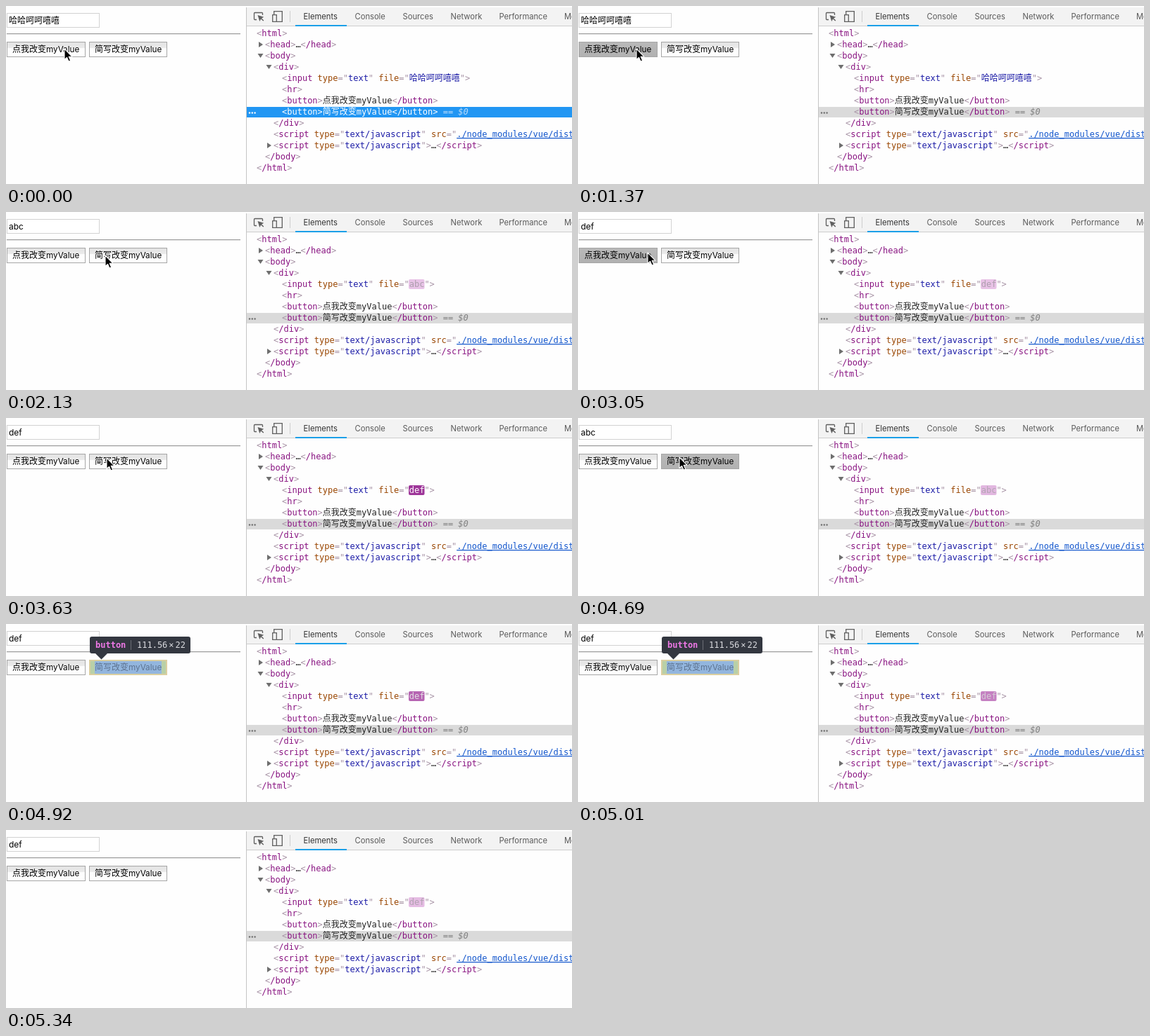
An HTML page for the animation above (5.71 s loop, 804 px wide and 254 px high).

```html
<!DOCTYPE html>
<html lang="zh-CN">
<head>
<meta charset="utf-8">
<title>myValue</title>
<style>
html, body { margin: 0; width: 100%; height: 100%; overflow: hidden; background: #fefefe; }
svg { display: block; width: 804px; height: 254px; }
text { white-space: pre; }
.ui { font: 12px Inter, "Noto Sans CJK SC", "Noto Sans CJK", sans-serif; fill: #000; }
.btn .latin { font-size: 11.7px; }
.tab { font: 11.2px Inter, sans-serif; fill: #5a5a5a; }
.tab.on { fill: #333; }
.code { font: 12px "DejaVu Sans Mono", "Noto Sans CJK SC", "Noto Sans CJK", monospace; fill: #222; }
.p { fill: #a894a6; }
.n { fill: #881280; }
.a { fill: #994500; }
.v { fill: #1a1aa6; }
.l { fill: #1155cc; text-decoration: underline; }
.eq { fill: #7f7f7f; }
.eq .zero { font-style: italic; }
.sel, .sel tspan { fill: #fff; }
.sel .eq, .sel .eq tspan { fill: #b9dcfb; }
</style>
</head>
<body>
<svg id="stage" viewBox="0 0 804 254" lang="zh-CN">
  <defs>
    <linearGradient id="idle" x2="0" y2="1">
      <stop offset="0" stop-color="#e3e3e3"/><stop offset=".4" stop-color="#ebebeb"/>
      <stop offset=".43" stop-color="#fdfdfd"/><stop offset="1" stop-color="#fefefe"/>
    </linearGradient>
    <linearGradient id="down" x2="0" y2="1">
      <stop offset="0" stop-color="#b9b9b9"/><stop offset="1" stop-color="#b1b1b1"/>
    </linearGradient>
  </defs>
  <rect width="804" height="254" fill="#fefefe"/>
  <g id="page"></g>
  <g id="tools"></g>
  <g id="inspect">
    <rect x="118" y="51" width="111" height="22" fill="#dbcfa0"/>
    <rect x="120" y="53" width="107" height="18" fill="#b9d0a8"/>
    <rect x="126" y="53" width="95" height="18" fill="#93b6de"/>
    <text class="ui btn" x="126" y="66" style="fill:#5d7390">简写改变<tspan class="latin">myValue</tspan></text>
    <path d="M122 18h137q3 0 3 3v18q0 3-3 3H144l-8.500 8.500-8.500-8.500h-5q-3 0-3-3V21q0-3 3-3z" fill="#333740"/>
    <path d="M177.500 23v14" stroke="#6b6e76"/>
    <text class="code" x="127" y="34" style="fill:#ee78e6;font-weight:bold">button</text>
    <text class="code" x="186" y="34" style="fill:#d9dade">111.56<tspan dx="2">×</tspan><tspan dx="2">22</tspan></text>
  </g>
  <path id="cursor" d="M0 0V15.500L3.500 12.300 6 18 8.600 16.900 6.200 11.300H11z" fill="#000" stroke="#fff" stroke-width="1.100" stroke-linejoin="round"/>
</svg>
<script>
const LOOP = 5710;
const $ = id => document.getElementById(id);
const WORD = '哈哈呵呵嘻嘻';

// Screen refreshes come every 60 ms inside these spans
const SPANS = [[0, 0], [1370, 1370], [1550, 2070], [2130, 2700], [2760, 3290], [3340, 3860],
  [3920, 4460], [4520, 4880], [4920, 4920], [5010, 5010], [5100, 5160], [5340, 5340]];
// Press, release, button, new value
const CLICKS = [[1370, 1550, 0, 'abc'], [2370, 2490, 1, 'def'], [2990, 3110, 0, 'abc'],
  [3520, 3640, 1, 'def'], [4100, 4220, 0, 'abc'], [4700, 4820, 1, 'def']];
const PATH = [[0, 83, 61], [1550, 83, 61], [2070, 141, 62], [2490, 141, 62], [2760, 99, 58],
  [3110, 99, 58], [3400, 143, 57], [3640, 143, 57], [3920, 97, 58], [4220, 97, 58],
  [4280, 144, 56], [4820, 144, 56], [4900, 330, 120]];

const span = (cls, s, id = '') =>
  `<tspan class="${cls}"${id && ` id="${id}"`}>${s.replace(/</g, '&lt;')}</tspan>`;
const attr = (name, value) =>
  span('p', ' ') + span('a', name) + span('p', '="') + value + span('p', '"');
const open = (name, attrs = '') => span('p', '<') + span('n', name) + attrs + span('p', '>');
const close = name => span('p', '<') + span('n', '/' + name) + span('p', '>');
const line = (row, x, body, id = '') =>
  `<text class="code" x="${x}" y="${43 + row * 16}" id="${id}">${body}</text>`;
const arrow = (row, x, down) => {
  const y = 39 + row * 16;
  const d = down ? `M${x - 1} ${y - 3}h8l-4 6z` : `M${x} ${y - 4}v8l6-4z`;
  return `<path d="${d}" fill="#6e6e6e"/>`;
};
const button = (i, x, w, label) =>
  `<rect id="btn${i}" x="${x + .5}" y="51.5" width="${w - 1}" height="21" stroke="#a6a6a6"/>
  <text class="ui btn" x="${x + 8}" y="66">${label}<tspan class="latin">myValue</tspan></text>`;

$('page').innerHTML = `
  <rect x="1.500" y="10.500" width="131" height="20" fill="#fff" stroke="#d2d2d2"/>
  <text class="ui" id="field" x="4" y="25"></text>
  <path d="M1 39.500h332" stroke="#9c9c9c"/><path d="M1 40.500h332" stroke="#e6e6e6"/>
  ${button(0, 1, 112, '点我改变')}${button(1, 118, 111, '简写改变')}`;

const tabs = [['Elements', 422.5], ['Console', 495.5], ['Sources', 563.5], ['Network', 631.5],
  ['Performance', 700.5], ['Memory', 793]];
const script = attr('type', span('v', 'text/javascript'));
const link = attr('src', span('l', './node_modules/vue/dist/vue.js'));

$('tools').innerHTML = `
  <rect x="342" y="2" width="462" height="27" fill="#f3f3f3"/>
  <path d="M342 28.500h462M403.500 7v16" stroke="#cdcdcd"/>
  <path d="M341.500 2v252" stroke="#c4c4c4"/>
  <rect x="411" y="27" width="73" height="2" fill="#1a9fe8"/>
  <g fill="none" stroke="#5f5f5f" stroke-width="1.300">
    <path d="M356 19.500h-2.500q-1 0-1-1v-8q0-1 1-1h10q1 0 1 1v2.500"/>
    <path d="M357.500 13l2.800 9 1.800-3.400 3.200 3 1-1-3.200-3 3.200-1.800z" fill="#5f5f5f" stroke="none"/>
    <path d="M381 11V7.700h7.500V11M381 11v11.300M378.700 12.700h5.600v9.600h-5.600z" stroke="none"/>
    <path d="M380.700 12V7.700h11.600v14.600H385M378.700 12.700h5.600v9.600h-5.600z"/>
  </g>
  ${tabs.map(([s, x], i) => `<text class="tab${i ? '' : ' on'}" x="${x}" y="19">${s}</text>`).join('')}
  <rect id="band" x="342" y="144" width="462" height="15"/>
  <g id="dots"><circle cx="346" cy="152.500" r="1.200"/><circle cx="349.800" cy="152.500" r="1.200"/><circle cx="353.600" cy="152.500" r="1.200"/></g>
  <rect id="flash" x="572" y="96" width="22.500" height="14" rx="2"/>
  ${line(0, 356, open('html'))}
  ${arrow(1, 359)}${line(1, 368, open('head') + '…' + close('head'))}
  ${arrow(2, 358.5, true)}${line(2, 368, open('body'))}
  ${arrow(3, 370.5, true)}${line(3, 380, open('div'))}
  ${line(4, 392, open('input', attr('type', span('v', 'text')) + attr('file', span('v', '', 'value'))))}
  ${line(5, 392, open('hr'))}
  ${line(6, 392, open('button') + '点我改变myValue' + close('button'))}
  ${line(7, 392, open('button') + '简写改变myValue' + close('button') +
    '<tspan class="eq"> == <tspan class="zero">$0</tspan></tspan>', 'picked')}
  ${line(8, 380, close('div'))}
  ${line(9, 380, open('script', script + link))}
  ${arrow(10, 371)}${line(10, 380, open('script', script) + '…' + close('script'))}
  ${line(11, 368, close('body'))}
  ${line(12, 356, close('html'))}`;

function snap(t) {
  const [a, b] = SPANS.filter(s => s[0] <= t).pop();
  return Math.min(b, a + Math.floor((t - a + 10) / 60) * 60);
}

// cubic-bezier(0, 0, .2, 1)
function ease(x) {
  let lo = 0, hi = 1;
  for (let i = 0; i < 20; i++) {
    const m = (lo + hi) / 2;
    if (.6 * m * m + .4 * m ** 3 < x) lo = m; else hi = m;
  }
  return lo * lo * (3 - 2 * lo);
}
const mix = (a, b, k) => `rgb(${a.map((c, i) => Math.round(c + (b[i] - c) * k))})`;

function pointer(t) {
  const i = PATH.findIndex(p => p[0] > t);
  if (i < 0) return PATH[PATH.length - 1].slice(1);
  const [t0, x0, y0] = PATH[i - 1], [t1, x1, y1] = PATH[i];
  const u = (t - t0) / (t1 - t0), k = u * u * (3 - 2 * u);
  return [x0 + (x1 - x0) * k, y0 + (y1 - y0) * k];
}

function draw(time) {
  const t = snap(time);
  const last = CLICKS.filter(c => c[1] <= t).pop();
  const value = last ? last[3] : WORD;
  const age = last ? t - last[1] : Infinity;
  $('field').textContent = value;
  $('value').textContent = value;

  const lit = age < 1400;
  const k = ease(Math.min(1, age / 1120));
  $('flash').style.display = lit ? '' : 'none';
  $('flash').style.fill = mix([158, 54, 153], [245, 219, 244], k);
  $('value').style.fill = lit ? mix([255, 255, 255], [158, 140, 158], k) : '';

  for (const i of [0, 1]) {
    const held = CLICKS.some(c => c[2] === i && c[0] <= t && t < c[1]);
    $('btn' + i).setAttribute('fill', held ? 'url(#down)' : 'url(#idle)');
  }

  const focus = t < 1370;
  $('band').style.fill = focus ? '#2196f3' : '#dadada';
  $('dots').style.fill = focus ? '#fff' : '#6e6e6e';
  $('picked').setAttribute('class', focus ? 'code sel' : 'code');

  $('inspect').style.display = t >= 4920 && t < 5100 ? '' : 'none';
  const [x, y] = pointer(t);
  $('cursor').style.display = t < 4900 ? '' : 'none';
  $('cursor').setAttribute('transform', `translate(${Math.round(x)} ${Math.round(y)})`);
}

const start = performance.now();
function tick() {
  draw((performance.now() - start) % LOOP);
  requestAnimationFrame(tick);
}
tick();
</script>
</body>
</html>
```
